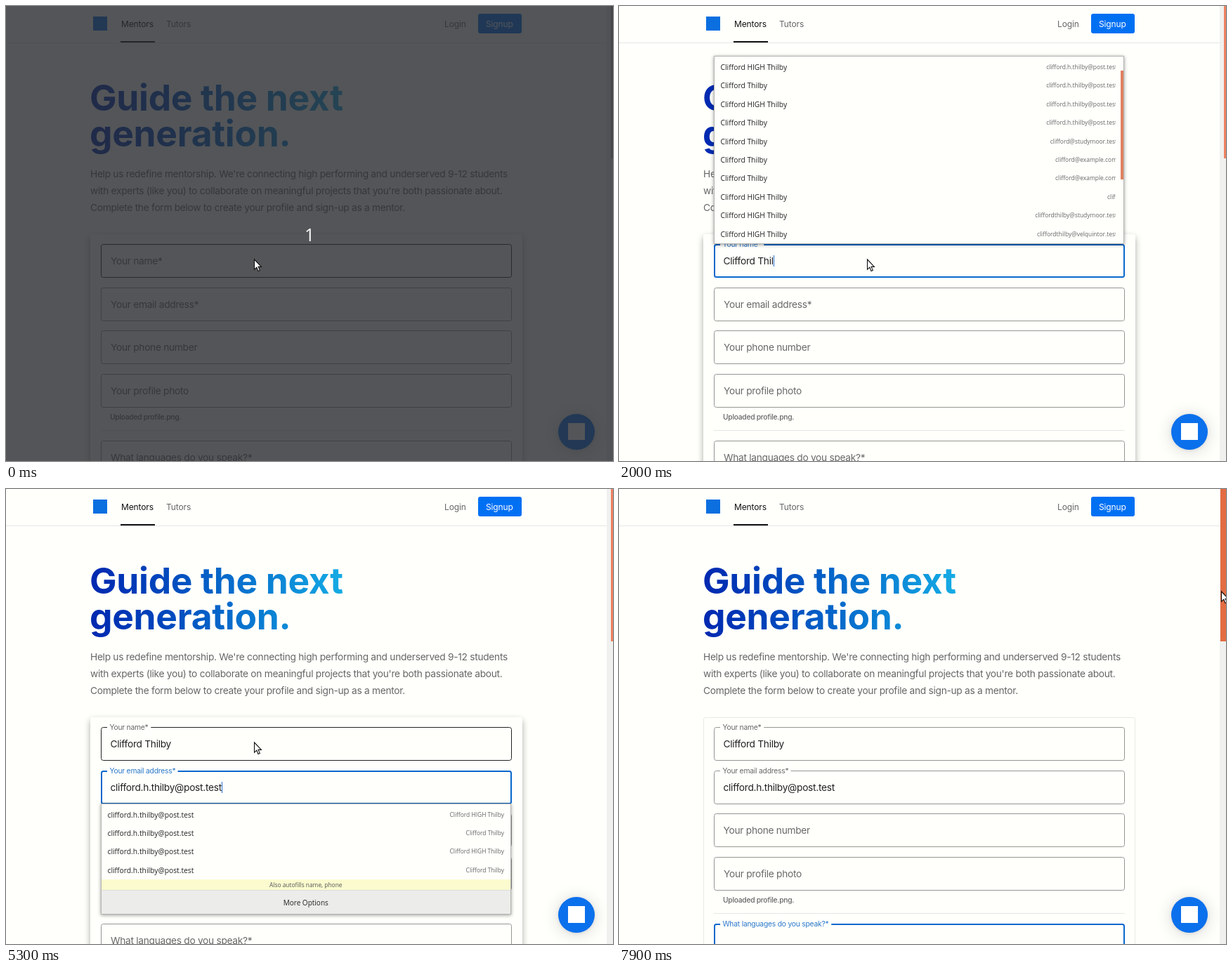
These frames come from a looping animation (864x648 px, 8 s). An HTML page:

```html
<!DOCTYPE html>
<html lang="en">
<head>
<meta charset="utf-8">
<title>Mentor sign-up form</title>
<style>
  html, body { margin: 0; width: 100%; height: 100%; overflow: hidden; background: #fffffc; }
  #stage {
    position: absolute; left: 0; top: 0; width: 864px; height: 648px; overflow: hidden;
    background: #fffffc; color: #666; font: 13.714px/18px Inter, sans-serif;
    letter-spacing: -.02em; font-optical-sizing: none; white-space: nowrap;
  }
  #stage div, #stage svg, h1, p { position: absolute; margin: 0; box-sizing: border-box; }
  .nav { top: 16.5px; font-size: 12px; letter-spacing: -.01em; }
  h1 {
    left: 119px; top: 104.8px; width: 615px; padding-bottom: 10px;
    font-size: 51.43px; line-height: 51.43px; font-weight: 700;
    color: transparent; -webkit-background-clip: text; background-clip: text;
    background-image: linear-gradient(90deg, #0028b0, #0045bc 100px, #0b86d6 270px, #14aae4 356px);
  }
  p { left: 120px; top: 227px; line-height: 24px; }
  #card { left: 120px; top: 324.5px; width: 614.5px; height: 420px; border-radius: 3px; border: 1px solid; }
  .field { left: 135px; width: 585px; height: 48px; border-radius: 3.5px; border: 1px solid; }
  .label { left: 144.4px; padding: 0 4.6px; background: #fffffc; transform-origin: 0 50%; }
  .value { left: 148.5px; color: #212121; }
  .caret { width: 1px; height: 16px; background: #2a6fd0; }
  .popup {
    left: 134.5px; width: 584.5px; overflow: hidden; padding-top: 2px; background: #fffffc;
    border: 1px solid #b4b4b0; box-shadow: 0 1px 5px rgba(0,0,0,.4);
    font: 10.3px/26.4px "Open Sans", sans-serif; letter-spacing: 0; color: #222;
  }
  #stage .row { position: relative; height: 26.4px; padding-left: 9px; overflow: hidden; }
  .row span { position: absolute; left: 300px; width: 273.5px; text-align: right; font-size: 8.45px; color: #666; }
  #stage .long .row { width: 571.5px; }
  #stage .note, #stage .more { position: relative; text-align: center; }
  .note { height: 15px; font-size: 8.4px; line-height: 15px; background: #fbfbcf; color: #555; }
  .more { height: 36px; font-size: 10px; line-height: 34px; background: #ececea; border-top: 1px solid #ddd; }
</style>
</head>
<body>
<div id="stage">
  <div style="left:0;top:52px;width:855px;height:1px;background:#e6e6e4"></div>
  <div style="left:124px;top:15px;width:20px;height:20px;background:#0b6fe0"></div>
  <div class="nav" style="left:164px;color:#111">Mentors</div>
  <div style="left:163px;top:50px;width:48.5px;height:2px;background:#111"></div>
  <div class="nav" style="left:228px">Tutors</div>
  <div class="nav" style="left:624px">Login</div>
  <div style="left:672px;top:11px;width:62px;height:27.5px;border-radius:3px;background:#0070f3"></div>
  <div class="nav" style="left:683px;color:#fff">Signup</div>
  <h1>Guide the next<br>generation.</h1>
  <p>Help us redefine mentorship. We're connecting high performing and underserved 9-12 students<br>
  with experts (like you) to collaborate on meaningful projects that you're both passionate about.<br>
  Complete the form below to create your profile and sign-up as a mentor.</p>
  <div id="card"></div>
  <div style="left:148px;top:576px;font-size:10.29px;font-weight:500">Uploaded profile.png.</div>
  <div style="left:135px;top:604px;width:585px;height:1px;background:#e6e6e4"></div>
  <div id="form" style="left:0;top:0"></div>
  <div style="left:786px;top:580.5px;width:51.5px;height:51.5px;border-radius:50%;background:#0b70ec;box-shadow:0 1px 5px rgba(0,0,0,.08),0 2px 24px rgba(0,0,0,.16)"></div>
  <div style="left:800px;top:594px;width:24px;height:24px;background:#fff"></div>
  <div style="left:855px;top:0;width:9px;height:648px;background:#f0f0ee"></div>
  <div id="thumb" style="right:0;top:0;height:216.5px"></div>
  <div id="popups" style="left:0;top:0"></div>
  <div id="dim" style="left:0;top:0;width:864px;height:648px;background:rgba(40,43,48,.8)">
    <div style="left:0;top:308px;width:864px;text-align:center;color:#fff;font:25px/34px 'Open Sans',sans-serif">1</div>
  </div>
  <svg id="arrow" width="14" height="20" style="overflow:visible"><path d="M.5 0V14.2L3.8 11.2 6 16.4 8.3 15.4 6.1 10.4H10.4Z" fill="#fff" stroke="#111" stroke-width="1.1"/></svg>
  <svg id="beam" width="1" height="1" style="overflow:visible"><g fill="none"><path d="M-3-6H3M-3 6H3M0-6V6" stroke="#fff" stroke-width="3.4"/><path d="M-3-6H3M-3 6H3M0-6V6" stroke="#111" stroke-width="1.5"/></g></svg>
</div>
<script>
const LOOP = 8000, STEP = 100;
const $ = id => document.getElementById(id);
const clamp = x => Math.max(0, Math.min(1, x));
const smooth = x => x * x * (3 - 2 * x);
const within = (t, a, b) => t >= a && t < b;

function add(parent, className, text = '') {
  const el = document.createElement('div');
  el.className = className;
  el.textContent = text;
  return parent.appendChild(el);
}

const NAME = 'Clifford Thilby', HIGH = 'Clifford HIGH Thilby';
const MAIL = 'clifford.h.thilby@post.test';

// keys: [time, number of characters typed]
const fields = [
  { label: 'Your name*', top: 339, focus: [400, 2300], text: NAME, floats: true,
    keys: [[1100, 2], [1200, 3], [1400, 4], [1500, 6], [1700, 8], [1800, 9], [1900, 11], [2000, 13], [2100, 15]] },
  { label: 'Your email address*', top: 400.7, focus: [2300, 5500], text: MAIL, floats: true,
    keys: [[2600, 1], [2700, 2], [2800, 3], [2900, 5], [3000, 6], [3100, 8], [3300, 10], [3400, 11],
      [3500, 13], [3600, 14], [3700, 16], [3800, 17], [4000, 18], [4100, 19], [4300, 20], [4400, 21],
      [4500, 22], [4600, 23], [5000, 24], [5100, 25], [5200, 26], [5300, 27]] },
  { label: 'Your phone number', top: 462, focus: [5500, 5800], text: '', keys: [], floats: true },
  { label: 'Your profile photo', top: 523.5, focus: [5800, 6300], text: '', keys: [], floats: false },
  { label: 'What languages do you speak?*', top: 619, focus: [6300, LOOP], text: '', keys: [], floats: true }
];

for (const f of fields) {
  const form = $('form');
  f.box = add(form, 'field');
  f.tag = add(form, 'label', f.label);
  f.value = add(form, 'value');
  f.caret = add(form, 'caret');
  f.box.style.top = f.top + 'px';
  f.tag.style.top = f.value.style.top = f.top + 15 + 'px';
  f.caret.style.top = f.top + 16 + 'px';
}

const mailRows = [
  [MAIL, HIGH], [MAIL, NAME], [MAIL, HIGH], [MAIL, NAME],
  ['clifford@studymoor.test', NAME], ['clifford@example.com', NAME], ['clifford@example.com', NAME],
  ['cliff', HIGH], ['cliffordthilby@studymoor.test', HIGH], ['cliffordthilby@velquintor.test', HIGH]
];
const nameRows = mailRows.map(([mail, name]) => [name, mail]);

function makePopup(rows, top, height, times, isLong) {
  const el = add($('popups'), 'popup' + (isLong ? ' long' : ''));
  el.style.top = top + 'px';
  el.style.height = height + 'px';
  for (const [main, side] of rows) {
    const span = document.createElement('span');
    span.textContent = side;
    add(el, 'row', main).append(span);
  }
  if (isLong) {
    add(el, '').style.cssText = 'left:578px;top:20px;width:4.5px;height:155px;background:#e0805f';
  } else {
    add(el, 'note', 'Also autofills name, phone');
    add(el, 'more', 'More Options');
  }
  return { el, times };
}

const popups = [
  makePopup(nameRows, 71, 268, [1400, 2300], true),
  makePopup(mailRows, 132, 268, [2600, 3500], true),
  makePopup(mailRows.slice(0, 4), 447.5, 3, [3800, 4000]),
  makePopup(mailRows.slice(0, 4), 447.5, 158, [4000, 5400])
];

function drawField(f, t, hovered) {
  const [start, end] = f.focus;
  const focused = within(t, start, end);
  const rise = at => smooth(clamp((t - at + 50) / 170));
  const up = f.floats ? rise(start) - (f.text ? 0 : rise(end)) : 0;
  const typed = f.keys.reduce((n, [at, count]) => t >= at ? count : n, 0);

  f.box.style.border = focused ? '2px solid #0a68cc' : `1px solid ${hovered ? '#222' : '#959592'}`;
  f.tag.style.color = focused ? '#2a78ca' : '#686868';
  f.tag.style.transform = `translateY(${-23.6 * up}px) scale(${1 - .25 * up})`;
  f.tag.style.visibility = up < 1 && typed ? 'hidden' : 'visible';
  f.value.textContent = f.text.slice(0, typed);

  const blinkedOff = within(t, 4800, 5000) || t >= 7000;
  f.caret.style.display = focused && t >= start + 100 && !blinkedOff ? '' : 'none';
  f.caret.style.left = 148.5 + f.value.offsetWidth + 'px';
}

function draw(time) {
  const t = Math.floor(time % LOOP / STEP) * STEP;

  const travel = smooth(clamp((t - 6900) / 800));
  const x = 352.5 + 504 * travel, y = 361 - 215 * travel;
  const popupOpen = popups.some(p => within(t, ...p.times));
  const covered = within(t, 2600, 3500);
  const onName = !covered && x < 718 && y > 339;
  const arrow = t < 200 || popupOpen || within(t, 3500, 3800) || !onName;
  $('arrow').style.display = arrow ? '' : 'none';
  $('beam').style.display = arrow ? 'none' : '';
  $('arrow').style.left = x + 'px';
  $('arrow').style.top = y + 'px';
  $('beam').style.left = x + 2 + 'px';
  $('beam').style.top = y + 2 + 'px';

  fields.forEach((f, i) => drawField(f, t, i === 0 && onName));
  for (const p of popups) p.el.style.display = within(t, ...p.times) ? '' : 'none';

  const fade = (from, length) => clamp((t - from) / length);
  const lift = 1 - fade(2700, 300) + fade(3500, 300) - fade(7200, 300);
  $('card').style.boxShadow = `0 4px 10px rgba(0,0,0,${.34 * lift})`;
  $('card').style.borderColor = `rgba(0,0,0,${.09 * (1 - lift)})`;

  const thumb = $('thumb').style;
  thumb.width = t >= 7700 ? '8px' : '3px';
  thumb.background = t < 400 ? '#b9b9b5' : t < 7900 ? '#ee8262' : '#e36c43';

  $('dim').style.opacity = t < 100 ? 1 : t < 200 ? .4 : 0;
}

function loop() {
  draw(performance.now());
  requestAnimationFrame(loop);
}
loop();
</script>
</body>
</html>
```
